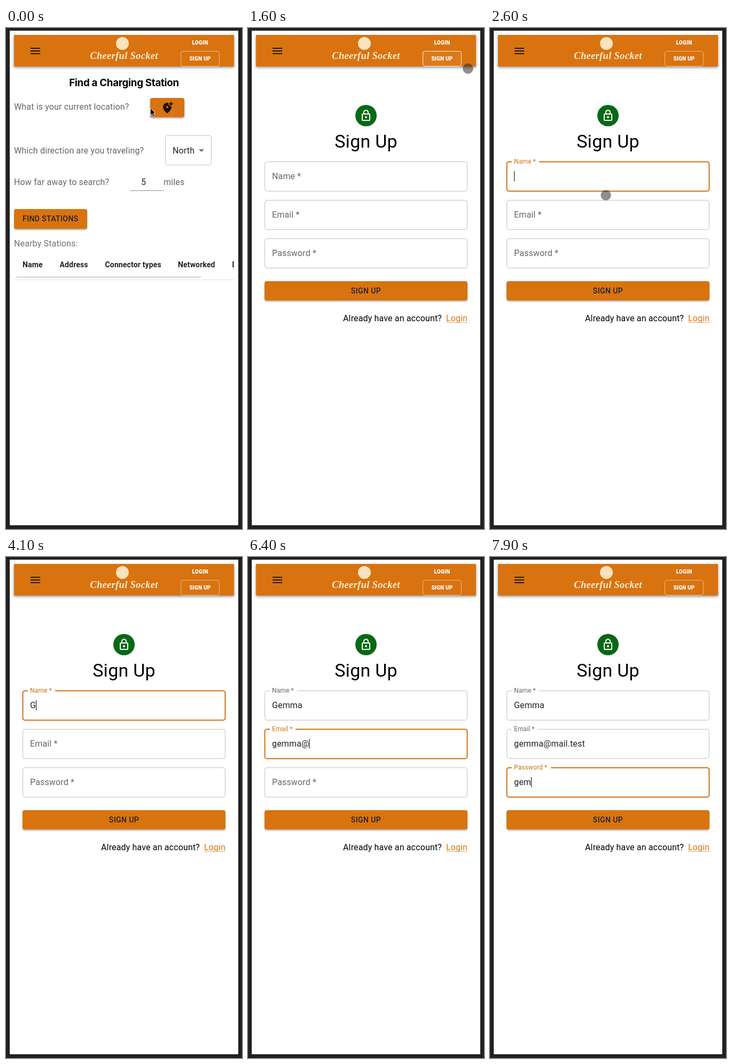
These frames come from a looping animation (442 by 938 pixels, 8 s). An HTML page:

```html
<!DOCTYPE html>
<html lang="en">
<head>
<meta charset="utf-8">
<title>Sign up</title>
<style>
  html, body { margin: 0; width: 100%; height: 100%; overflow: hidden; background: #222023; }
  svg { display: block; }
  text { font: 16px Roboto, sans-serif; letter-spacing: .15px; fill: #212121; white-space: pre; }
  .muted { fill: #666; }
  .small { font-size: 10px; font-weight: 800; letter-spacing: .2px; fill: #fff; text-anchor: middle; }
  .button { font-size: 14px; font-weight: 500; letter-spacing: .4px; }
  .head { font-size: 14px; font-weight: 600; }
  .title { font: 700 18.72px Inter, sans-serif; letter-spacing: -.3px; fill: #000; text-anchor: middle; }
  .brand { font: italic 700 18.5px "Liberation Serif", serif; fill: #fdecd2; text-anchor: middle; letter-spacing: .3px; }
  .orange { fill: #d97310; }
  .raised { filter: drop-shadow(0 2px 1.5px rgba(0,0,0,.33)); }
  .outline { fill: none; stroke: #c0c0c0; }
</style>
</head>
<body>
<svg width="442" height="938" viewBox="0 0 442 938">
  <clipPath id="panel"><rect x="7" y="5" width="428" height="926"/></clipPath>
  <clipPath id="content"><rect x="15" y="80" width="412" height="851"/></clipPath>
  <rect x="7" y="5" width="428" height="926" fill="#fff"/>

  <rect class="orange" x="15" y="13" width="412" height="59" style="filter:drop-shadow(0 2px 2.5px rgba(0,0,0,.45))"/>
  <path d="M46 37h18v2H46zm0 5h18v2H46zm0 5h18v2H46z" fill="#211a14"/>
  <circle cx="218" cy="29" r="12" fill="#fbe3bd"/>
  <text class="brand" x="221" y="58">Cheerful Socket</text>
  <text class="small" x="363.5" y="31">LOGIN</text>
  <rect id="signUpButton" x="327.5" y="43.5" width="72" height="28" rx="4" fill="#fff" stroke="#fff"/>
  <text class="small" x="363.5" y="61">SIGN UP</text>

  <g id="findPage" clip-path="url(#content)">
    <text class="title" x="221" y="109">Find a Charging Station</text>
    <text class="muted" x="15" y="153">What is your current location?</text>
    <rect class="orange raised" x="270" y="131" width="64" height="36" rx="4"/>
    <path transform="translate(290 137)" fill="#1b140d" d="M20 1v3h3v2h-3v3h-2V6h-3V4h3V1h2zm-8 12c1.1 0 2-.9 2-2s-.9-2-2-2-2 .9-2 2 .9 2 2 2zm2-9.75V7h3v3h2.92c.05.39.08.79.08 1.2 0 3.32-2.67 7.25-8 11.8-5.33-4.55-8-8.48-8-11.8C4 6.22 7.8 3 12 3c.68 0 1.35.08 2 .25z"/>
    <text class="muted" x="15" y="235">Which direction are you traveling?</text>
    <rect class="outline" x="298.5" y="201.5" width="86" height="55" rx="4"/>
    <text x="312" y="235">North</text>
    <path d="M361 227h10l-5 5z" fill="#757575"/>
    <text class="muted" x="15" y="294">How far away to search?</text>
    <text x="253" y="294">5</text>
    <path d="M233 304.5h62" stroke="#8c8c8c"/>
    <text class="muted" x="295" y="294">miles</text>
    <rect class="orange raised" x="15" y="339" width="137" height="37" rx="4"/>
    <text class="button" x="31" y="362">FIND STATIONS</text>
    <text x="15" y="409" style="fill:#727272">Nearby Stations:</text>
    <text class="head" x="31" y="448">Name</text>
    <text class="head" x="100.5" y="448">Address</text>
    <text class="head" x="185.5" y="448">Connector types</text>
    <text class="head" x="322" y="448">Networked</text>
    <text class="head" x="423.5" y="448">Distance</text>
    <path d="M19 466.5h346" stroke="#dcdcdc" stroke-width="3"/>
    <path d="M15 471.5h412" stroke="#dedede"/>
  </g>

  <g id="signUpPage">
    <circle cx="221" cy="164" r="20" fill="#046a14"/>
    <path transform="translate(209 152)" fill="#fff" d="M12 17c1.1 0 2-.9 2-2s-.9-2-2-2-2 .9-2 2 .9 2 2 2zm6-9h-1V6c0-2.76-2.24-5-5-5S7 3.24 7 6v2H6c-1.1 0-2 .9-2 2v10c0 1.1.9 2 2 2h12c1.1 0 2-.9 2-2V10c0-1.1-.9-2-2-2zM8.9 6c0-1.71 1.39-3.1 3.1-3.1s3.1 1.39 3.1 3.1v2H8.9V6zM18 20H6V10h12v10z"/>
    <text x="221" y="224" text-anchor="middle" style="font-size:34px;letter-spacing:.25px;fill:#000">Sign Up</text>
    <g id="fields"></g>
    <rect class="orange raised" x="31" y="474" width="380" height="36" rx="4"/>
    <text class="button" x="221" y="497" text-anchor="middle">SIGN UP</text>
    <text x="363" y="549" text-anchor="end" style="fill:#000">Already have an account?</text>
    <text class="orange" x="371" y="549">Login</text>
    <path d="M371 551.5h40" stroke="#e6a565"/>
  </g>

  <g clip-path="url(#panel)">
    <path id="arrow" transform="translate(270 149)" d="M.5 1v13.5l3-2.8 2.2 5 2.4-1-2.2-4.9h4z" fill="#000" stroke="#fff" stroke-width=".8"/>
    <circle id="touch" r="9.5" fill="rgba(32,32,32,.5)" stroke="rgba(32,32,32,.15)"/>
  </g>
</svg>
<script>
const LOOP = 8000, PAGE_CHANGE = 1200;
const byId = id => document.getElementById(id);
const clamp = v => Math.min(1, Math.max(0, v));
const easeOut = p => 1 - (1 - p) ** 3;
const easeInOut = p => p * p * (3 - 2 * p);

// Touch pointer stops: time, x, y
const pointerPath = [
  [50, 272, 156], [750, 378, 30], [850, 378, 30], [1050, 372, 57], [1250, 372, 57],
  [1550, 412, 76], [1850, 412, 76], [2200, 222, 282], [2350, 222, 282],
  [2600, 217, 313], [3100, 217, 313], [3850, 215, 945]
];

// Each field: typing runs give [text, first key time, time between keys]
const fields = [
  { label: 'Name *', notch: 51, focus: 2300, blur: 5200, runs: [['G', 4000, 0], ['emma', 4400, 190]] },
  { label: 'Email *', notch: 48, focus: 5200, blur: 7050, runs: [['gemma', 5400, 140], ['@', 6250, 0], ['mail.test', 6450, 52]] },
  { label: 'Password *', notch: 73, focus: 7050, blur: LOOP, runs: [['gem', 7300, 250]] }
];

function add(parent, tag, attributes, content = '') {
  const node = document.createElementNS('http://www.w3.org/2000/svg', tag);
  for (const key in attributes) node.setAttribute(key, attributes[key]);
  node.textContent = content;
  return parent.appendChild(node);
}

fields.forEach((field, i) => {
  const group = add(byId('fields'), 'g', { transform: `translate(31 ${250 + 72 * i})` });
  field.box = add(group, 'rect', { class: 'outline', x: .5, y: .5, width: 379, height: 55, rx: 4 });
  field.gap = add(group, 'rect', { x: 10, y: -2, height: 5, fill: '#fff' });
  field.name = add(group, 'text', {}, field.label);
  field.value = add(group, 'text', { x: 14, y: 33 });
  field.caret = add(group, 'rect', { y: 18, width: 1, height: 19, fill: '#000' });
});

const typed = (runs, t) => runs.map(([text, start, step]) =>
  [...text].filter((_, i) => t >= start + i * step).join('')).join('');

function drawField(field, t) {
  const focused = t >= field.focus && t < field.blur;
  const lift = easeOut(clamp((t - field.focus) / 200));
  const text = typed(field.runs, t);
  field.box.style.stroke = focused ? '#cf7113' : '';
  field.box.style.strokeWidth = focused ? 2 : 1;
  field.gap.setAttribute('width', field.notch * lift);
  field.name.setAttribute('transform', `translate(14 ${33 - 29.2 * lift}) scale(${1 - .25 * lift})`);
  field.name.style.fill = focused ? '#cf7113' : '#666';
  field.value.textContent = text;
  // The caret blinks only while the field waits for its first key.
  const blinkOff = !text && (t - field.focus) % 1600 > 800;
  field.caret.setAttribute('x', 14 + (text ? field.value.getComputedTextLength() : 0));
  field.caret.style.display = focused && !blinkOff ? '' : 'none';
}

function pointerAt(t) {
  const next = pointerPath.findIndex(stop => stop[0] > t);
  if (next < 0) return pointerPath.at(-1).slice(1);
  const [t0, x0, y0] = pointerPath[Math.max(0, next - 1)], [t1, x1, y1] = pointerPath[next];
  const p = t1 > t0 ? easeInOut(clamp((t - t0) / (t1 - t0))) : 0;
  return [x0 + (x1 - x0) * p, y0 + (y1 - y0) * p];
}

function draw(now) {
  const t = now % LOOP;
  const signingUp = t >= PAGE_CHANGE;
  byId('findPage').style.display = signingUp ? 'none' : '';
  byId('signUpPage').style.display = signingUp ? '' : 'none';

  const pressed = t > 1050 && t < 1900;
  byId('signUpButton').style.fillOpacity = pressed ? .05 : 0;
  byId('signUpButton').style.strokeOpacity = pressed ? .9 : .5;

  byId('arrow').style.display = t < 100 ? '' : 'none';
  byId('touch').style.display = t < 100 ? 'none' : '';
  byId('touch').setAttribute('transform', `translate(${pointerAt(t)})`);
  if (signingUp) fields.forEach(field => drawField(field, t));
}

const start = performance.now();
function tick() {
  draw(performance.now() - start);
  requestAnimationFrame(tick);
}
tick();
</script>
</body>
</html>
```
